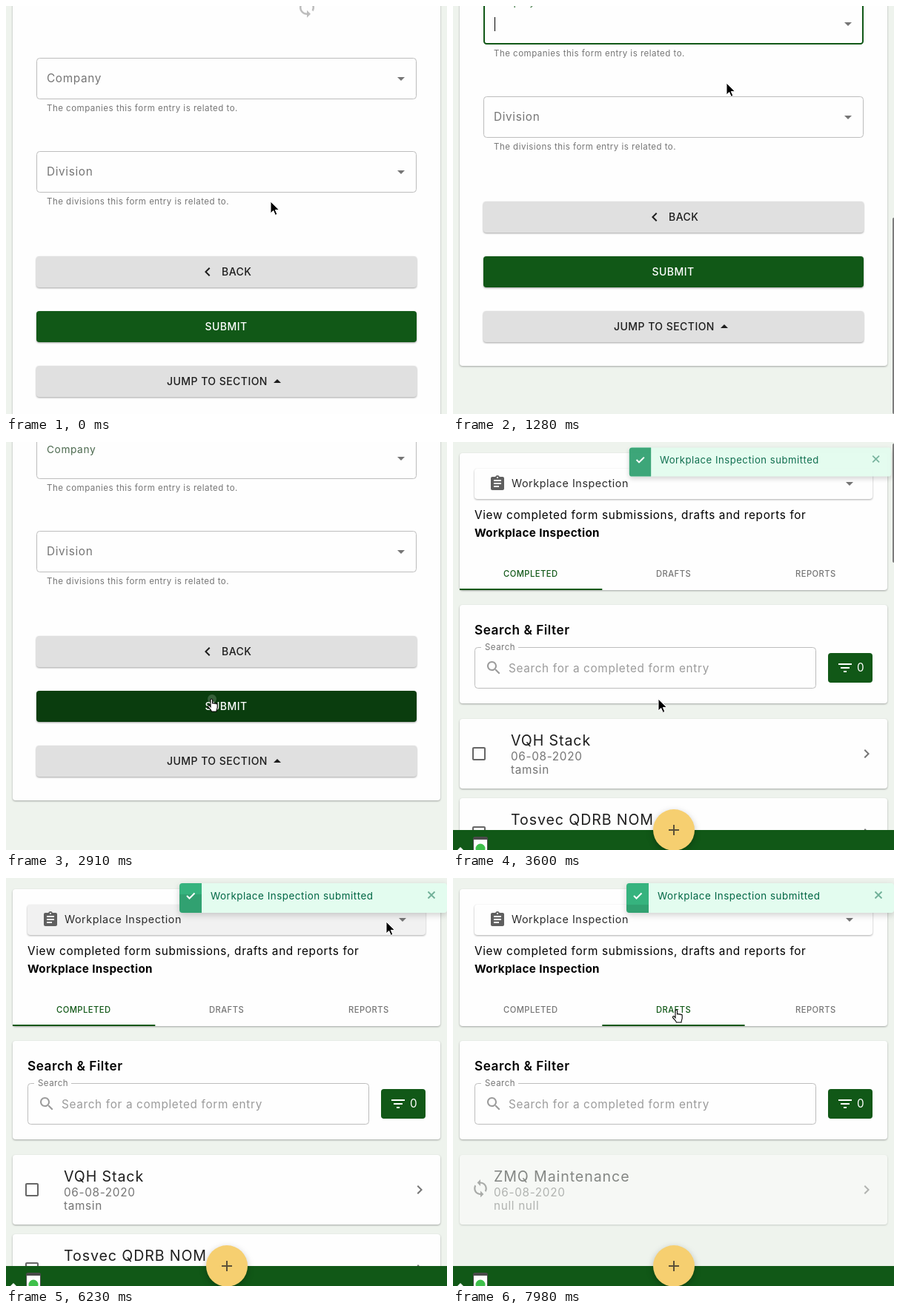
An HTML page for the animation above (8000 ms loop, 595 by 551 pixels).

```html
<!DOCTYPE html>
<html lang="en">
<head>
<meta charset="utf-8">
<title>Form submission</title>
<style>
html, body { margin: 0; width: 100%; height: 100%; overflow: hidden; background: #eef3ed; }
svg { display: block; width: 595px; height: 551px; }
text { font-family: Inter, "Work Sans", sans-serif; white-space: pre; }
.body { font-size: 15.3px; letter-spacing: .67px; }
.small { font-size: 11.5px; letter-spacing: .49px; }
.pick { font-size: 14.3px; letter-spacing: .58px; }
.bold { font-size: 15.2px; letter-spacing: .35px; font-weight: 700; }
.head { font-size: 17.2px; letter-spacing: .53px; font-weight: 600; }
.title { font-size: 19.6px; letter-spacing: .9px; }
.btn { font-size: 14px; letter-spacing: .45px; font-weight: 500; }
.tab { font-size: 11.2px; letter-spacing: .45px; font-weight: 500; }
.toast { font-size: 13.4px; letter-spacing: .53px; }
.card { fill: #fefefe; filter: drop-shadow(0 1px 1px rgba(0,0,0,.32)); }
.raised { filter: drop-shadow(0 1.5px 1.2px rgba(0,0,0,.36)); }
.fab { filter: drop-shadow(0 3px 4px rgba(0,0,0,.25)); }
.pop { filter: drop-shadow(0 3px 4px rgba(0,0,0,.18)); }
</style>
</head>
<body>
<svg id="stage" viewBox="0 0 595 551" xmlns="http://www.w3.org/2000/svg"></svg>
<script>
const GREEN = [17, 88, 23], DARK = [10, 61, 14], GREY = [117, 117, 117];
const rgb = c => `rgb(${c.map(Math.round)})`;
const green = rgb(GREEN), grey = rgb(GREY), ink = '#1d1d1d', line = '#bdbdbd';

const ICON = {
  down: 'M7 10l5 5 5-5z',
  up: 'M7 14l5-5 5 5z',
  left: 'M15.41 7.41 14 6l-6 6 6 6 1.41-1.41L10.83 12z',
  right: 'M10 6L8.59 7.41 13.17 12l-4.58 4.59L10 18l6-6z',
  box: 'M19 5v14H5V5h14m0-2H5c-1.1 0-2 .9-2 2v14c0 1.1.9 2 2 2h14c1.1 0 2-.9 2-2V5c0-1.1-.9-2-2-2z',
  filter: 'M10 18h4v-2h-4v2zM3 6v2h18V6H3zm3 7h12v-2H6v2z',
  search: 'M15.5 14h-.79l-.28-.27C15.41 12.59 16 11.11 16 9.5 16 5.91 13.09 3 9.5 3S3 5.91 3 9.5 5.91 16 9.5 16c1.61 0 3.09-.59 4.23-1.57l.27.28v.79l5 4.99L20.49 19l-4.99-5zm-6 0C7.01 14 5 11.99 5 9.5S7.01 5 9.5 5 14 7.01 14 9.5 11.99 14 9.5 14z',
  form: 'M19 3h-4.18C14.4 1.84 13.3 1 12 1c-1.3 0-2.4.84-2.82 2H5c-1.1 0-2 .9-2 2v14c0 1.1.9 2 2 2h14c1.1 0 2-.9 2-2V5c0-1.1-.9-2-2-2zm-7 0c.55 0 1 .45 1 1s-.45 1-1 1-1-.45-1-1 .45-1 1-1zm2 14H7v-2h7v2zm3-4H7v-2h10v2zm0-4H7V7h10v2z',
  sync: 'M12 4V1L8 5l4 4V6c3.31 0 6 2.69 6 6 0 1.01-.25 1.97-.7 2.8l1.46 1.46C19.54 15.03 20 13.57 20 12c0-4.42-3.58-8-8-8zm0 14c-3.31 0-6-2.69-6-6 0-1.01.25-1.97.7-2.8L5.24 7.74C4.46 8.97 4 10.43 4 12c0 4.42 3.58 8 8 8v3l4-4-4-4v3z'
};

const text = (s, x, y, cls, fill = ink, more = '') =>
  `<text x="${x}" y="${y}" class="${cls}" fill="${fill}" ${more}>${s}</text>`;
const rect = (x, y, w, h, fill, more = '') =>
  `<rect x="${x}" y="${y}" width="${w}" height="${h}" fill="${fill}" ${more}/>`;
const icon = (name, x, y, fill, scale = 1) =>
  `<path d="${ICON[name]}" fill="${fill}" transform="translate(${x} ${y}) scale(${scale})"/>`;
const card = (y, h) => `<rect class="card" x="9" y="${y}" width="577" height="${h}" rx="4"/>`;
const outline = (x, y, w, h, more = '') =>
  rect(x + .5, y + .5, w - 1, h - 1, 'none', `rx="4" stroke="${line}" ${more}`);

const field = (y, help) =>
  outline(41, y, 513, 56) + icon('down', 521, y + 16, grey) + text(help, 55, y + 72, 'small', grey);
const button = (y, fill, more = '') => rect(41, y, 513, 42, fill, `rx="4" class="raised" ${more}`);
const entry = (y, x, title, who, mark) => card(y, 94) + mark
  + text(title, x, y + 36, 'title')
  + text('06-08-2020', x, y + 56, 'body', grey)
  + text(who, x, y + 74, 'body', grey)
  + icon('right', 546, y + 35, grey);

const formView = `
<g id="form">
  ${card(-80, 640)}
  ${icon('sync', 391, -13, '#bdbdbd', 1.25)}
  ${field(70, 'The companies this form entry is related to.')}
  ${rect(42, 71, 511, 54, 'none', `id="focus" rx="3.5" stroke="${green}" stroke-width="2"`)}
  ${rect(50, 69, 66, 4, '#fefefe', 'id="notch"')}
  <g id="label">${text('Company', 0, 0, 'body', 'inherit')}</g>
  ${rect(56, 89, 1, 19, '#000', 'id="caret"')}
  ${field(196, 'The divisions this form entry is related to.')}
  ${text('Division', 55, 229, 'body', grey)}
  ${button(338, '#e0e0e0')}${icon('left', 260, 347, ink)}${text('BACK', 291, 364, 'btn')}
  ${button(412, green, 'id="submit"')}
  <circle id="ripple" cx="278" cy="423" fill="#fff" clip-path="url(#inSubmit)"/>
  ${text('SUBMIT', 268.5, 438, 'btn', '#fff')}
  ${button(486, '#e0e0e0')}${text('JUMP TO SECTION', 217, 512, 'btn')}${icon('up', 354, 495, ink)}
</g>
<rect id="bar1" x="593" width="4" rx="2" fill="#7d7d7d"/>`;

const listView = `
<g id="list">
  ${card(15, 185)}
  <rect id="pick" class="card" x="29" y="36" width="537" height="41" rx="4"/>
  ${icon('form', 48, 44, '#5f5f5f')}
  ${text('Workplace Inspection', 79, 61, 'pick', '#2a2a2a')}
  ${icon('down', 523, 44, grey)}
  ${text('View completed form submissions, drafts and reports for', 29, 104, 'body', '#000')}
  ${text('Workplace Inspection', 29, 128, 'bold', '#000')}
  <circle id="tabRipple" cx="301" cy="178" fill="${green}" clip-path="url(#inTab)"/>
  ${text('COMPLETED', 68, 182, 'tab', grey, 'id="tab1"')}
  ${text('DRAFTS', 274, 182, 'tab', grey, 'id="tab2"')}
  ${text('REPORTS', 462, 182, 'tab', grey)}
  ${rect(9, 198, 192.3, 2, green, 'id="mark"')}
  ${card(220, 133)}
  ${text('Search &amp; Filter', 29, 260, 'head', '#000')}
  ${outline(29, 277, 461, 56)}
  ${rect(38, 276, 50, 3, '#fefefe')}
  ${text('Search', 43, 281, 'small', grey)}
  ${icon('search', 43, 293, '#9b9b9b')}
  ${text('Search for a completed form entry', 75, 311, 'body', '#9b9b9b')}
  ${rect(506, 285, 60, 40, green, 'rx="4"')}${icon('filter', 517, 293, '#fff')}
  ${text('0', 545, 310, 'body', '#fff')}
  <g id="done">
    ${entry(374, 78, 'VQH Stack', 'tamsin', icon('box', 23, 409, '#666'))}
    ${entry(481, 78, 'Tosvec QDRB NOM', 'tamsin', icon('box', 23, 516, '#666'))}
  </g>
  <g id="drafts">${entry(374, 55, 'ZMQ Maintenance', 'null null', icon('sync', 23.8, 406, '#666', 1.1))}</g>
  ${rect(0, 524, 595, 27, green)}
  <path d="M5.5 551.5l4.5-4.500 4.500 4.500z" fill="#fff"/>
  ${rect(27, 533, 20, 24, '#4a4a4a', 'rx="2.500"')}${rect(28, 537, 18, 20, '#fff')}
  <circle cx="37" cy="549" r="6.500" fill="#3fc04b"/>
  <circle class="fab" cx="298" cy="524" r="28" fill="#f6cf70"/>
  <path d="M291 524h14M298 517v14" stroke="#5c5038" stroke-width="2"/>
  <rect id="bar2" x="593" y="2" width="4" height="161" rx="2" fill="#7d7d7d"/>
  <g id="toast">
    ${rect(234, 7, 361, 40, '#e3fcef', 'rx="4" class="pop"')}
    <path d="M264 7h-26a4 4 0 0 0-4 4v32a4 4 0 0 0 4 4h26z" fill="#36b37e"/>
    <g clip-path="url(#inToast)"><rect id="timer" x="234" width="30" fill="#000" opacity=".1"/></g>
    <path d="M244 24l3.500 3.500 7-7" fill="none" stroke="#fff" stroke-width="2"/>
    ${text('Workplace Inspection submitted', 276, 29, 'toast', '#064')}
    <path d="M569.500 18.500l9 9m0-9l-9 9" stroke="#064" stroke-width="1.800" opacity=".5"/>
  </g>
</g>`;

const cursors = `
<path id="arrow" d="M0 0v16l3.700-3.600 2.600 6 2.600-1.100-2.600-5.900h5.200z" fill="#000" stroke="#fff"/>
<path id="hand" d="M4 1.500c0-2 2.600-2 2.600 0v5c0-1.400 2.300-1.400 2.400.1.200-1.200 2.200-1 2.200.4.300-1 2-.8 2 .6v3.600c0 2-1.200 2.600-1.200 5.800H5.400c-.6-2.400-2.900-3.800-4.700-6.400-1-1.600.9-2.500 2-1.400L4 10.700z" fill="#fff" stroke="#000" stroke-width="1.100"/>`;

const stage = document.getElementById('stage');
stage.innerHTML = `<defs>
  <clipPath id="inSubmit"><rect x="41" y="412" width="513" height="42" rx="4"/></clipPath>
  <clipPath id="inTab"><rect x="201.300" y="152" width="192.300" height="48"/></clipPath>
  <clipPath id="inToast"><rect x="234" y="7" width="40" height="40" rx="4"/></clipPath>
</defs>${rect(0, 0, 595, 551, '#eef3ed')}${formView}${listView}${cursors}`;

const el = {};
stage.querySelectorAll('[id]').forEach(n => el[n.id] = n);
const set = (id, attrs) => { for (const k in attrs) el[id].setAttribute(k, attrs[k]); };
const show = (id, on) => set(id, { display: on ? 'inline' : 'none' });

const ramp = (t, a, b) => Math.min(1, Math.max(0, (t - a) / (b - a)));
const smooth = p => p * p * (3 - 2 * p);
const cubic = p => p < .5 ? 4 * p ** 3 : 1 - 4 * (1 - p) ** 3;
const mix = (a, b, p) => a.map((v, i) => v + (b[i] - v) * p);

// Keys are [time, ...values]
function track(keys, t, ease = p => p) {
  let i = 0;
  while (i < keys.length - 2 && t >= keys[i + 1][0]) i++;
  const a = keys[i], b = keys[i + 1];
  return mix(a.slice(1), b.slice(1), ease(ramp(t, a[0], b[0])));
}

const pointer = [
  [60, 357, 264], [400, 382, 100], [1110, 382, 100], [1280, 369, 104], [1680, 354, 116],
  [1740, 354, 116], [2500, 277, 347], [3720, 277, 347], [4400, 440, 70], [4520, 452, 62],
  [4900, 480, 12], [5370, 498, 81], [5430, 499, 72], [5750, 510, 2], [6230, 513, 59],
  [6340, 513, 59], [7040, 301, 178]
];
const scroll = [[950, 0], [1030, 10], [1110, 32], [1200, 60], [1280, 74], [1400, 76]];
const CLICK = 2815, SWITCH = 3440, TAB = 7570;

function drawForm(t) {
  const [s] = track(scroll, t);
  set('form', { transform: `translate(0 ${-s})` });

  const lift = smooth(ramp(t, 885, 1085)) - smooth(ramp(t, 2800, 3000));
  const focused = t >= 885 && t < CLICK;
  show('focus', focused);
  set('notch', { width: 66 * lift });
  set('label', {
    transform: `translate(55 ${103 - 29 * lift}) scale(${1 - .25 * lift})`,
    fill: rgb(mix(GREY, GREEN, lift))
  });
  el.label.firstChild.setAttribute('fill', rgb(mix(GREY, GREEN, lift)));
  show('caret', focused && (t - 885) % 1000 < 500);

  set('submit', { fill: rgb(mix(GREEN, DARK, ramp(t, 2440, 2640))) });
  set('ripple', {
    r: 280 * cubic(ramp(t, CLICK, CLICK + 550)),
    opacity: .18 * (1 - ramp(t, 3000, 3400))
  });
  const top = 247 + .524 * s;
  set('bar1', { y: top, height: 551 - top, opacity: ramp(t, 950, 970) - ramp(t, 1750, 2000) });
}

function drawList(t) {
  set('pick', { style: `fill:${t > 4430 && t < TAB ? '#f1f1f1' : '#fefefe'}` });
  set('bar2', { opacity: 1 - ramp(t, 3950, 4200) });

  const left = 1 - (1 - ramp(t, 3468, 3688)) ** 3;
  const k = .66 + .34 * left;
  set('toast', {
    transform: `translate(414.5 27) scale(${k}) translate(-414.5 -27)`,
    opacity: left
  });
  // The countdown pauses while the pointer rests on the toast
  const run = Math.max(0, t - 3560) - 440 * ramp(t, 4650, 5090) - 355 * ramp(t, 5590, 5945);
  const y = 7 + run * .008;
  set('timer', { y, height: 47 - y });

  const drafts = t >= TAB;
  set('tab1', { fill: drafts ? grey : green });
  set('tab2', { fill: drafts ? green : grey });
  set('mark', { x: 9 + 192.3 * smooth(ramp(t, TAB, TAB + 300)) });
  set('tabRipple', {
    r: 105 * smooth(ramp(t, TAB, TAB + 350)),
    opacity: .18 * (1 - ramp(t, TAB + 150, TAB + 380))
  });
  show('done', t < 7660);
  set('drafts', { opacity: .5 * ramp(t, 7660, 7860) });
}

function draw(t) {
  const onList = t >= SWITCH;
  show('form', !onList);
  show('bar1', !onList);
  show('list', onList);
  if (onList) drawList(t); else drawForm(t);

  const [x, y] = track(pointer, t, smooth);
  const hand = (t > 2440 && t < SWITCH) || t > 6880;
  show('arrow', !hand);
  show('hand', hand);
  set('arrow', { transform: `translate(${x} ${y})` });
  set('hand', { transform: `translate(${x - 5} ${y})` });
}

const start = performance.now();
function tick() {
  draw((performance.now() - start) % 8000);
  requestAnimationFrame(tick);
}
tick();
</script>
</body>
</html>
```
